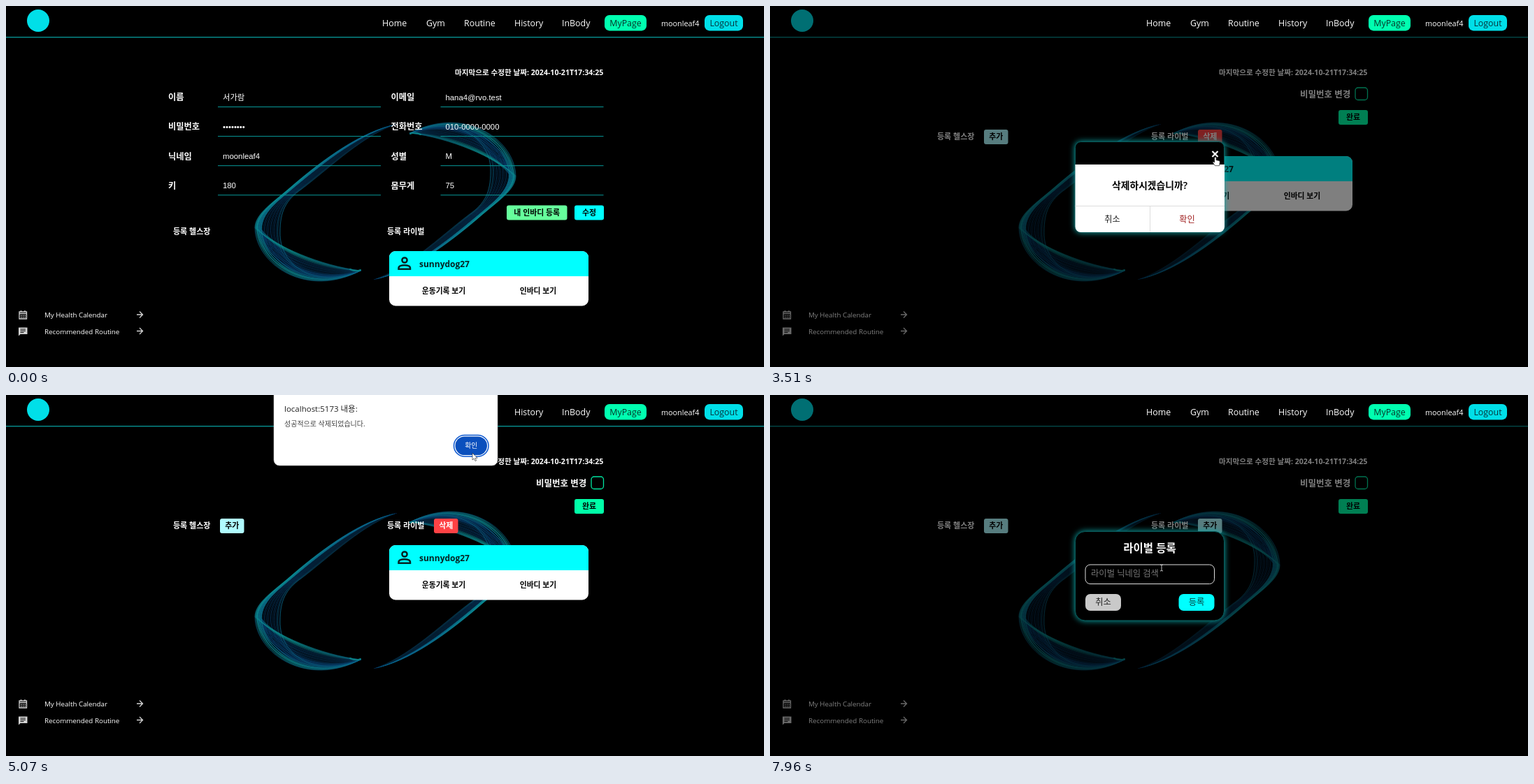
An HTML page for the animation above (8 s loop, 1084 px wide and 517 px high).

```html
<!DOCTYPE html>
<html lang="ko">
<head>
<meta charset="utf-8">
<title>My page</title>
<style>
  html, body { margin: 0; width: 100%; height: 100%; overflow: hidden; background: #000; }
  svg { display: block; width: 100%; height: 100%; }
  text { font-family: "Open Sans", "Noto Sans CJK KR", "Noto Sans CJK JP", sans-serif; white-space: pre; }
  .input text { font-family: "Liberation Sans", "Noto Sans CJK KR", sans-serif; }
  .glow { filter: drop-shadow(0 0 4px #0aa9a9); }
</style>
</head>
<body>
<svg id="stage" viewBox="0 0 1084 517"></svg>
<script>
const LOOP = 8000;
const mix = (a, b, k) => a + (b - a) * k;

// Text placed by its vertical middle.
const text = (x, y, s, size, fill = '#fff', weight = 400, anchor = 'start') =>
  `<text x="${x}" y="${y + size * .36}" font-size="${size}" fill="${fill}" font-weight="${weight}" text-anchor="${anchor}">${s}</text>`;
const rect = (x, y, w, h, r, fill, extra = '') =>
  `<rect x="${x}" y="${y}" width="${w}" height="${h}" rx="${r}" fill="${fill}" ${extra}/>`;
const button = (x, y, w, h, r, fill, label, size = 10.9, color = '#000', weight = 700) =>
  rect(x, y, w, h, r, fill) + text(x + w / 2, y + h / 2, label, size, color, weight, 'middle');
const group = (id, body) => `<g id="${id}">${body}</g>`;

// One thread of the ribbon: u moves it inwards, v from the fold to the outer rim.
function strand(u, v, ink, opacity) {
  const px = 356 + 36 * u, py = 318 + 6 * u;
  const d = `M560 169C${508 + 4 * u} ${179 + 5 * u} ${452 + 14 * u} ${221 + 8 * u} ${410 + 13 * u} ${257 + 5 * u}`
    + `C${383 + 17 * u} ${281 - 3 * u} ${px} ${297 - 3 * u} ${px} ${py}`
    + `C${mix(386, 357 + 34 * u, v)} ${mix(345, 370, v)} ${mix(450, 430 + 8 * u, v)} ${mix(372, 420 - 14 * u, v)} 507 379`;
  return `<path d="${d}" stroke="url(#${ink})" stroke-opacity="${opacity}"/>`;
}
function ribbon() {
  let s = '';
  for (let i = 0; i <= 24; i++) s += strand(i / 24, 1 - .25 * (i % 4) / 3, 'blue', i % 3 ? .45 : .8);
  for (let i = 0; i <= 44; i++) {
    const v = i / 44, rim = Math.abs(v - .5) * 2;
    s += strand(.05 + .22 * (i * .618 % 1), v, rim > .65 ? 'teal' : 'blue', .4 + .25 * rim);
  }
  for (let i = 0; i < 10; i++) s += strand(i / 80, i % 2 ? 1 - i / 90 : i / 90, 'teal', .5);
  s += strand(.9, 1, 'teal', .35) + strand(1, 1, 'teal', .45);
  return s + '<path d="M492 377q8 4 15 1" stroke="#0b8084" stroke-width="2"/>';
}
const gradient = (id, far, near) =>
  `<linearGradient id="${id}" gradientUnits="userSpaceOnUse" x1="560" y1="0" x2="410" y2="0">
   <stop offset="0" stop-color="${far}" stop-opacity="0"/><stop offset=".4" stop-color="${far}" stop-opacity=".5"/><stop offset="1" stop-color="${near}"/></linearGradient>`;

const defs = `<defs>${gradient('teal', '#0a6a8c', '#0a8b8f')}${gradient('blue', '#07406c', '#074072')}
  <g id="half" fill="none" stroke-width=".8" stroke-linecap="round">${ribbon()}</g></defs>`;
const backdrop = '<use href="#half"/><use href="#half" transform="rotate(180 542.5 280.5)"/>';

const arrow = y => `<path d="M187 ${y}h8.5m-4.5-4.5l4.5 4.5l-4.5 4.5"/>`;
const sidebar = `<g fill="none" stroke="#d4d4d4" stroke-width="1.3">
    <path d="M19 438h10.500v10h-10.500zM19 440.500h10.500M21.500 436v2M27 436v2"/>
    <path d="M21 443.500h7M21 446h7" stroke-dasharray="1.400 1.400"/>${arrow(442)}${arrow(465.5)}</g>
  <path d="M18 460.500h12.500v9.500h-10l-2.500 2.500z" fill="#d4d4d4"/>
  <path d="M20.500 463h7.500M20.500 465.300h7.500M20.500 467.600h5" stroke="#000"/>`
  + text(55, 442.5, 'My Health Calendar', 9.8, '#fff', 500) + text(55, 466.5, 'Recommended Routine', 9.8, '#fff', 500);

const header = '<circle cx="46" cy="21" r="16" fill="#00dfe8"/>' + rect(0, 44, 1084, 1.4, 0, '#07908f');
const nav = [[538, 'Home'], [601, 'Gym'], [655, 'Routine'], [727, 'History'], [795, 'InBody']]
  .map(([x, s]) => text(x, 24.5, s, 12.4, '#fff', 500)).join('')
  + button(856, 13, 60, 22.4, 7, '#00ffb0', 'MyPage', 12.4, '#06332a', 500)
  + text(937, 25, 'moonleaf4', 10.8, '#fff', 500)
  + button(999, 13, 55, 22.4, 7, '#00dfe8', 'Logout', 12.4, '#06333a', 500);

const fields = [
  ['이름', '서가람', '이메일', 'hana4@rvo.test'],
  ['비밀번호', '••••••••', '전화번호', '010-0000-0000'],
  ['닉네임', 'moonleaf4', '성별', 'M'],
  ['키', '180', '몸무게', '75']];
const field = (x, y, label, value) => text(x, y, label, 12.2, '#fff', 700)
  + `<g class="input">${text(x + 78, y, value, 11.35)}</g>` + rect(x + 71, y + 13, 233, 1, 0, '#079a9a');
const form = fields.map(([a, b, c, d], i) => field(232, 131 + i * 42.1, a, b) + field(550.5, 131 + i * 42.1, c, d)).join('')
  + button(716, 285.5, 86.5, 21, 3, '#66ff9c', '내 인바디 등록') + button(813, 285.5, 42, 21, 3, '#0ff', '수정');

const headings = text(239, 323.5, '등록 헬스장', 11, '#fff', 700) + text(545, 323.5, '등록 라이벌', 11, '#fff', 700);
const card = rect(548, 351, 285, 78.5, 9, '#fff')
  + '<path d="M548 387v-27a9 9 0 0 1 9-9h267a9 9 0 0 1 9 9v27z" fill="#0ff"/>'
  + '<g fill="none" stroke="#062424" stroke-width="2.500"><circle cx="570" cy="364" r="3.600"/><path d="M561.500 376.800v-1.500c0-5.500 16.500-5.500 16.500 0v1.500z"/></g>'
  + text(591, 370, 'sunnydog27', 12, '#062424', 700)
  + text(626, 408, '운동기록 보기', 10.8, '#000', 700, 'middle') + text(761, 408, '인바디 보기', 10.8, '#000', 700, 'middle');

// Button beside a heading.
const chip = (x, fill, label, color) => button(x, 177, 34.5, 21, 3, fill, label, 10.9, color);
const edit = text(758, 126, '비밀번호 변경', 12.5, '#fff', 700)
  + rect(837, 117, 17.5, 17.5, 4, 'none', 'stroke="#00e5a0" stroke-width="1.300"')
  + button(813, 149, 42, 21, 3, '#00ffa8', '완료') + chip(306, '#b0fbff', '추가');

const shade = rect(0, 0, 1084, 517, 0, '#000', 'opacity=".5"');
const confirmBox = rect(436.5, 194.5, 213, 129.5, 8, '#000', 'class="glow" stroke="#0a5c5c"')
  + '<path d="M436.500 227h213.500v89a8 8 0 0 1-8 8h-197.500a8 8 0 0 1-8-8z" fill="#fff"/>'
  + '<path id="hover" d="M543.500 287h106.500v29a8 8 0 0 1-8 8h-98.500z" fill="#eee"/>'
  + '<path d="M436.500 286.500h213.500M543.500 287v37" stroke="#ddd"/>'
  + '<path d="M632.500 208l8 8m0-8l-8 8" stroke="#fff" stroke-width="2.200"/>'
  + text(543, 257, '삭제하시겠습니까?', 13.8, '#000', 600, 'middle')
  + text(489.5, 306, '취소', 12.2, '#222', 400, 'middle') + text(596.5, 306, '확인', 12.2, '#a02020', 400, 'middle');
const searchBox = rect(436.5, 195.5, 213, 127.5, 14, '#000', 'class="glow" stroke="#0a5c5c"')
  + text(543, 219.5, '라이벌 등록', 15.5, '#fff', 700, 'middle')
  + rect(451, 243, 184.5, 27.5, 7, '#000', 'stroke="#ddd"') + text(459, 256, '라이벌 닉네임 검색', 12.3, '#757575')
  + button(451, 285, 51, 24, 7, '#c9c9c9', '취소', 12.3, '#222', 400)
  + button(584.5, 285, 51, 24, 7, '#0ff', '등록', 12.3, '#064040', 400);

const alertBox = rect(383, -12, 320, 113, 8, '#fff', 'stroke="#bbb" stroke-width=".6"')
  + text(398, 19.5, 'localhost:5173 내용:', 11.5, '#222') + text(398, 41, '성공적으로 삭제되었습니다.', 10, '#444')
  + rect(640.5, 57.5, 49.5, 30.5, 15.2, '#fff', 'stroke="#0b57d0" stroke-width="1.500"')
  + button(642.5, 59.5, 45.5, 26.5, 13.2, '#0b50bd', '확인', 9.8, '#fff', 400);

const cursors = group('arrow', '<path d="M0 0v10l2.300-2.100l1.700 3.700l1.700-.8l-1.700-3.500h3.200z" fill="#fff" stroke="#222" stroke-width=".6"/>')
  + group('hand', '<path d="M-1.200 1q1.200-2 2.400 0v3.500l4 .8q1.300.4 1.200 2l-.7 5.200h-6.200l-3.500-5q.7-1.400 2.800.3z" fill="#fff" stroke="#222" stroke-width=".7"/>')
  + group('beam', '<path d="M-2-4q2 0 2 1v7q0 1-2 1m4-9q-2 0-2 1m0 7q0 1 2 1" fill="none" stroke="#ddd" stroke-width=".9"/>');

const stage = document.getElementById('stage');
stage.innerHTML = defs + backdrop + header + sidebar
  + text(642, 95, '마지막으로 수정한 날짜: 2024-10-21T17:34:25', 10.6, '#fff', 700)
  + group('form', form) + group('edit', edit)
  + group('list', headings + group('card', card))
  + group('remove', chip(612, '#ff4245', '삭제', '#fff')) + group('add', chip(612, '#b0fbff', '추가'))
  + group('shade', shade) + nav
  + group('confirmBox', confirmBox) + group('searchBox', searchBox)
  + group('alertBox', alertBox) + group('cursor', cursors);

const el = {};
stage.querySelectorAll('[id]').forEach(e => el[e.id] = e);
const show = (id, on) => el[id].setAttribute('visibility', on ? 'inherit' : 'hidden');

// Pointer stops: time, x, y.
const path = [
  [530, 1030, 488], [1280, 838, 297], [2000, 838, 297], [2050, 828, 293], [2250, 635, 196], [2450, 635, 196],
  [2520, 637, 194], [3450, 637, 194], [3510, 637, 216], [3910, 609, 300], [4870, 609, 300], [5070, 667, 83],
  [5680, 667, 78], [6570, 667, 78], [6620, 667, 93], [6750, 640, 169], [6840, 640, 169], [7140, 630, 182],
  [7630, 630, 182], [7960, 560, 247], [LOOP, 560, 247]];

function draw(t) {
  const within = (a, b) => t >= a && t < b;
  const editing = t >= 1440, removed = t >= 5900;
  show('form', !editing);
  show('edit', editing);
  el.list.setAttribute('transform', `translate(0 ${editing ? -136 : 0})`);
  show('card', !removed);
  show('remove', editing && !removed);
  show('add', removed);

  const asking = within(2980, 4250), searching = t >= 7280;
  show('shade', asking || searching);
  show('confirmBox', asking);
  show('hover', asking && t >= 3800);
  show('searchBox', searching);

  const ramp = (a, b) => Math.min(1, Math.max(0, (t - a) / (b - a)));
  const alpha = ramp(4400, 4590) * (1 - ramp(5750, 5880));
  show('alertBox', alpha > 0);
  el.alertBox.setAttribute('opacity', alpha);

  show('cursor', t >= 530);
  const i = Math.max(1, path.findIndex(p => p[0] > t)), [a, b] = [path[i - 1], path[i]];
  const k = Math.max(0, (t - a[0]) / (b[0] - a[0]));
  el.cursor.setAttribute('transform', `translate(${mix(a[1], b[1], k)} ${mix(a[2], b[2], k)})`);
  const beam = t >= 7900;
  const hand = within(1240, 1440) || within(2450, 2980) || within(3490, 3570) || within(3800, 4250) || within(7000, 7280);
  show('beam', beam);
  show('hand', hand);
  show('arrow', !beam && !hand);
}

const start = performance.now();
function tick() {
  draw((performance.now() - start) % LOOP);
  requestAnimationFrame(tick);
}
tick();
</script>
</body>
</html>
```
